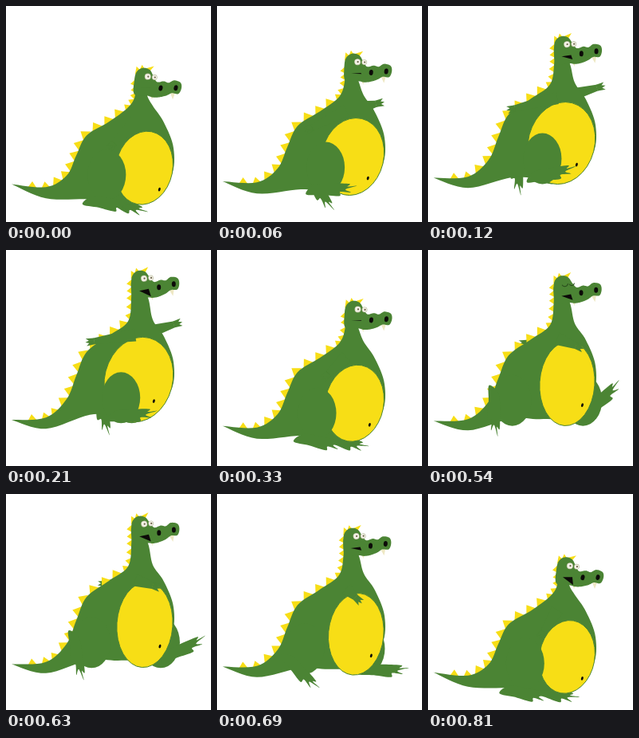
An HTML page with a canvas that plays this animation: 257x271 px, repeating every 0.84 s.

```html
<!DOCTYPE html>
<html>
<head>
<meta charset="utf-8">
<style>
html, body { margin: 0; height: 100%; overflow: hidden; background: #fff; }
canvas { display: block; }
</style>
</head>
<body>
<canvas id="stage" width="257" height="271"></canvas>
<script>
const LOOP = 840, STEP = 30;
const GREEN = '#4b8434', YELLOW = '#f7de16', BLACK = '#0c0a08';
const ctx = document.getElementById('stage').getContext('2d');

// Outlines of the crouching pose; the head is relative to the near eye, the foot to the heel
const BACK = [[50, 228], [76, 214], [88, 189], [101, 164], [129, 147], [153, 129]];
const FRONT = [[184, 127], [198, 148], [210, 180], [207, 215], [180, 243], [140, 247], [105, 244], [50, 242]];
const SKULL = [[-17, 5], [-14, -6], [-6, -11], [3, -8], [8, 2], [12, 7], [20, 6], [26, 8],
  [33, 5], [41, 8], [42, 15], [38, 22], [30, 21], [23, 24], [14, 26], [6, 26], [-1, 24], [-17, 22]];
const FOOT = [[-8, 1], [4, -9], [26, -7], [48, -3], [45, 0], [57, 1], [42, 3], [48, 8], [35, 5], [33, 10], [12, 5]];

// Once per loop: a cosine that peaks at the given time, and its sharpened positive half
const swing = (t, peak) => Math.cos((t - peak) / LOOP * 2 * Math.PI);
const pulse = (t, peak, power) => Math.max(0, swing(t, peak)) ** power;

// Two hops per loop, the second one a little early
function hop(t) {
  const early = 10 - 10 * swing(t, 120);
  return (.5 + .5 * swing(2 * (t + early), 390)) ** .8;
}

function hermite(a, b, ma, mb, u) {
  const v = u * u, w = v * u;
  return (2 * w - 3 * v + 1) * a + (w - 2 * v + u) * ma + (3 * v - 2 * w) * b + (w - v) * mb;
}

// Dense polyline through the points
function curve(pts, closed) {
  const n = pts.length, out = [];
  const at = i => closed ? pts[(i + n) % n] : pts[Math.max(0, Math.min(n - 1, i))];
  for (let i = 0; i < (closed ? n : n - 1); i++)
    for (let s = 0; s < 8; s++)
      out.push([0, 1].map(c => hermite(at(i)[c], at(i + 1)[c],
        (at(i + 1)[c] - at(i - 1)[c]) / 2, (at(i + 2)[c] - at(i)[c]) / 2, s / 8)));
  if (!closed) out.push(pts[n - 1]);
  return out;
}

function fill(pts, color) {
  ctx.beginPath();
  pts.forEach(p => ctx.lineTo(...p));
  ctx.closePath();
  ctx.fillStyle = color;
  ctx.fill();
}

function oval(x, y, rx, ry, color, turn = 0) {
  ctx.beginPath();
  ctx.ellipse(x, y, rx, ry, turn, 0, 7);
  ctx.fillStyle = color;
  ctx.fill();
}

function placed(x, y, degrees, paint) {
  ctx.save();
  ctx.translate(x, y);
  ctx.rotate(degrees * Math.PI / 180);
  paint();
  ctx.restore();
}

// Both legs share one gait, half a loop apart
function leg(t, h, offset, stride, kick) {
  const trail = pulse(t, 575, 2), reach = kick * pulse(t, 140, 3);
  oval(offset + 118 + 8 * h + 20 * swing(t, 155), 213 - 28 * h, 24, 32, GREEN);
  placed(offset + 92 + 16 * h + stride * swing(t, 155), 250 - 35 * h - 45 * trail - reach / 4,
    3 + 83 * trail - reach, () => fill(curve(FOOT, true), GREEN));
}

function arm(shoulder, hand) {
  const angle = Math.atan2(hand[1] - shoulder[1], hand[0] - shoulder[0]);
  const ray = (p, turn, r) => [p[0] + Math.cos(angle + turn) * r, p[1] + Math.sin(angle + turn) * r];
  const wrist = ray(hand, Math.PI, 10);
  fill([ray(shoulder, 1.57, 8), ray(shoulder, -1.57, 8), ray(wrist, -1.57, 4), ray(wrist, 1.57, 4)], GREEN);
  for (const turn of [-.45, 0, .45])
    fill([ray(wrist, -1.57, 4), ray(wrist, turn, 11), ray(wrist, 1.57, 4)], GREEN);
}

function spikes(line) {
  let run = 0, next = 22;
  for (let i = 1; i < line.length; i++) {
    const [px, py] = line[i - 1], [x, y] = line[i];
    const len = Math.hypot(x - px, y - py);
    run += len;
    if (!len || run < next) continue;
    const dx = (x - px) / len, dy = (y - py) / len;
    const neck = i > 46, size = neck ? 6 : i < 12 ? 7 : 9;
    next = run + (neck ? 8 : 13.5);
    fill([[x - dx * size * .8 - dy, y - dy * size * .8 + dx],
      [x + dy * size - dx, y - dx * size - dy],
      [x + dx * size * .8 - dy, y + dy * size * .8 + dx]], YELLOW);
  }
}

function head(mouth, blink) {
  fill([[-16, -3], [-14, -13], [-10, -9], [-7, -15], [-4, -10], [8, -13], [2, -6]], YELLOW);
  for (const x of [5, 31]) fill([[x - 3, 21], [x + 3, 21], [x, 29]], '#eee8c4');
  fill(curve(SKULL, true), GREEN);
  fill([[-9, 14], [3, 14], [4, 14 + 10 * mouth]], BLACK);
  for (const x of [16, 35]) oval(x, 14.5, 2.5, 3.5, BLACK, .2);
  for (const [x, y, r] of [[0, 0, 4], [8.5, 1, 3.4]]) {
    if (blink) {
      ctx.beginPath();
      ctx.arc(x - 2, y - 1, r, .3, 2.8);
      ctx.strokeStyle = '#28491c';
      ctx.lineWidth = 1;
      ctx.stroke();
    } else {
      oval(x, y, r, r, '#b9bda0');
      oval(x, y, r - .6, r - .6, '#f3f1e6');
      oval(x + .5, y, 1.1, 1.1, '#6b6049');
    }
  }
}

function draw(t) {
  const h = hop(t), sway = swing(t, 160);
  const lift = ([x, y]) => [x, y - h * Math.min(40, .36 * x)];
  const hx = 178 - 5 * h, hy = 91 - 56 * h;
  const tail = [7, 224 - 11 * h];
  const back = [tail, ...BACK.map(lift), [hx - 16, hy + 24], [hx - 16, hy + 4]];
  const torso = [...back, [hx - 8, hy], [hx - 1 + 6 * h, hy + 24], ...FRONT.map(lift), tail];
  const girth = 34 + 5 * h + 4 * sway, bellyX = 209 - girth, bellyY = 205 - 43 * h;

  ctx.clearRect(0, 0, 257, 271);
  arm(lift([180, 142]), [168 + 56 * sway, 146 - 45 * h - 12 * sway]);
  leg(t + LOOP / 2, h, 50, 48, 55);
  spikes(curve(back));
  fill(curve(torso), GREEN);
  oval(bellyX, bellyY, girth, 46 + 8 * h, YELLOW, .16 + .1 * sway);
  ctx.strokeStyle = GREEN;
  ctx.lineWidth = 1;
  ctx.stroke();
  oval(bellyX + 19, bellyY + 27, 1.4, 2.4, BLACK, .3);
  leg(t, h, 0, 28, 22);
  arm(lift([162, 146]), [147 - 50 * sway, 182 - 67 * h]);
  placed(hx, hy, -12 * h, () => head(t > 750 ? 1 : h * h, t >= 480 && t < 600));
}

function tick() {
  draw(Math.floor(performance.now() % LOOP / STEP) * STEP);
  requestAnimationFrame(tick);
}
tick();
</script>
</body>
</html>
```
